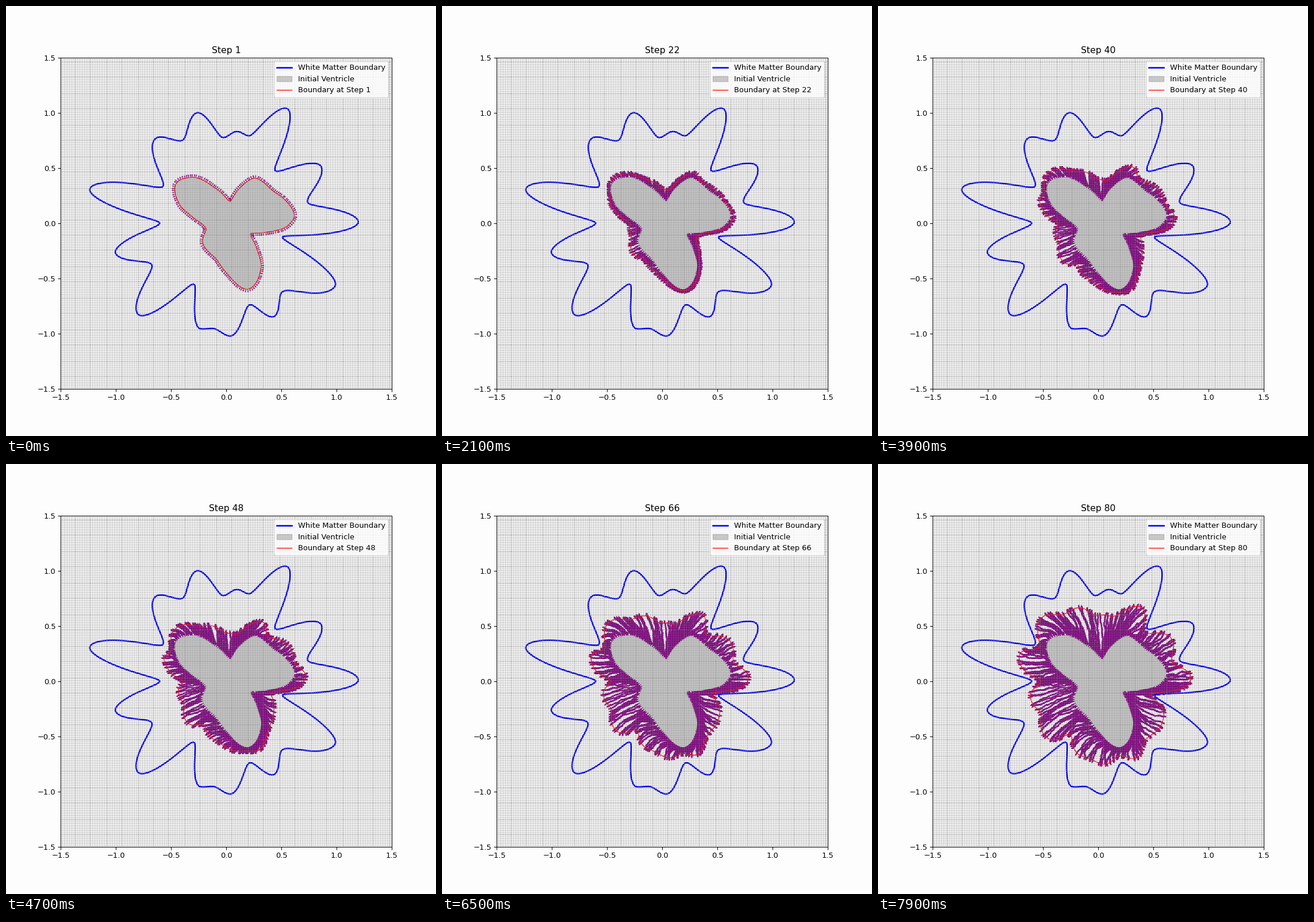
Animation, 748 px wide and 748 px high, one loop 8000 ms. Source, as a matplotlib script:

```python
import numpy as np
import matplotlib.pyplot as plt
from matplotlib.animation import FuncAnimation
from matplotlib.collections import PathCollection
from matplotlib.path import Path

STEPS, ARROWS = 80, 210
PIXEL = 1 / 192  # data units

# (angle in degrees, radius) of the tips and notches
WHITE_MATTER = [
    (0.5, 1.195), (14.5, .76), (31, 1.0), (47, .65), (62, 1.175),
    (76, .815), (83, .837), (92, .775), (105, 1.035), (118, .85),
    (130, 1.0), (150, .665), (166, 1.275), (180, .605), (195, 1.04),
    (209, .775), (226, 1.15), (242, .627), (256, .985), (263, .962),
    (272, 1.023), (286, .77), (297, .95), (309, .803), (330, 1.138),
    (346, .524)]
VENTRICLE = [
    (7, .62), (22, .57), (36, .51), (56, .49), (70, .33), (80, .20),
    (106, .32), (127, .52), (141, .58), (158, .46), (168, .33), (182, .22),
    (195, .19), (220, .28), (252, .33), (270, .45), (289, .63), (308, .51),
    (320, .36), (336, .24), (347, .37), (357, .55)]


def polar_curve(keys, theta):
    """Periodic monotone cubic through the keys: flat at every extreme."""
    a, r = np.array(keys).T
    a = np.radians(a)
    h = (np.roll(a, -1) - a) % (2 * np.pi)
    after = (np.roll(r, -1) - r) / h
    before = np.roll(after, 1)
    rising = before * after > 0
    tangent = np.where(
        rising, 2 * before * after / np.where(rising, before + after, 1), 0)

    j = np.searchsorted(a, theta, side="right") - 1
    k = (j + 1) % len(a)
    u = (theta - a[j]) % (2 * np.pi) / h[j]
    ease = u * u * (3 - 2 * u)
    return (r[j] + (r[k] - r[j]) * ease
            + h[j] * u * (1 - u) * ((1 - u) * tangent[j] - u * tangent[k]))


theta = np.linspace(0, 2 * np.pi, 1080, endpoint=False)
rays = np.column_stack([np.cos(theta), np.sin(theta)])
outer = polar_curve(WHITE_MATTER, theta)
inner = polar_curve(VENTRICLE, theta)

# Growth slows near the white matter; hollows move first and furthest.
reach = (0.56 - 0.45 * inner) * np.tanh((outer - inner) / 0.5)
pace = 0.9 + 0.8 * inner


def closed(p):
    return np.vstack([p, p[:1]])


def boundary(step):
    t = step / (STEPS - 1)
    return rays * (inner + reach * t ** pace)[:, None]


def along(p, fractions):
    """Points at fractions of the length of a closed curve."""
    c = closed(p)
    s = np.append(0, np.cumsum(np.hypot(*np.diff(c, axis=0).T)))
    t = fractions % 1 * s[-1]
    return np.column_stack([np.interp(t, s, c[:, 0]), np.interp(t, s, c[:, 1])])


ARROW = PIXEL * np.array([(0, -.55), (3, -.55), (2.6, -1.6), (5.8, 0),
                          (2.6, 1.6), (3, .55), (0, .55)])
rng = np.random.default_rng(4)
drift = np.cumsum(rng.normal(0, 0.1, (STEPS, ARROWS)), axis=0)


def arrow_path(step):
    curve = boundary(step)
    f = (np.arange(ARROWS) + drift[step]) / ARROWS
    p = along(curve, f)
    tangent = along(curve, f + 0.003) - along(curve, f - 0.003)
    tangent /= np.hypot(*tangent.T)[:, None]
    normal = tangent[:, ::-1] * [1, -1]
    polys = (p[:, None] + ARROW[:, :1] * normal[:, None]
             + ARROW[:, 1:] * tangent[:, None])
    return Path.make_compound_path(*[Path(closed(q), closed=True) for q in polys])


trail = [arrow_path(k) for k in range(STEPS)]

fig, ax = plt.subplots(figsize=(8, 8), dpi=93.5, facecolor="#fdfdfd")
ax.set_facecolor("#fdfdfd")
ax.set_aspect("equal")
ax.set_xlim(-1.5, 1.5)
ax.set_ylim(-1.5, 1.5)

gx, gy = np.meshgrid(*[np.linspace(-1.5, 1.5, 200)] * 2)
ax.plot(gx.ravel(), gy.ravel(), "o", ms=1.2, mew=0, color="gray", zorder=2.4)
ax.plot(*closed(rays * outer[:, None]).T, color="blue", lw=2,
        label="White Matter Boundary")
ax.fill(*boundary(0).T, color="gray", alpha=0.4, label="Initial Ventricle")
red, = ax.plot([], [], color="red", lw=1, label="Boundary at Step 1")
arrows = PathCollection(trail[:1], facecolors="purple", edgecolors="none",
                        transform=ax.transData, zorder=1.5)
ax.add_collection(arrows, autolim=False)
title = ax.set_title("Step 1")
label = ax.legend(loc="upper right").get_texts()[2]


def update(i):
    red.set_data(*closed(boundary(i)).T)
    arrows.set_paths(trail[:i + 1])
    title.set_text(f"Step {i + 1}")
    label.set_text(f"Boundary at Step {i + 1}")
    return red, arrows, title, label


anim = FuncAnimation(fig, update, frames=STEPS, interval=100,
                     repeat=True, repeat_delay=0)
plt.show()
```
